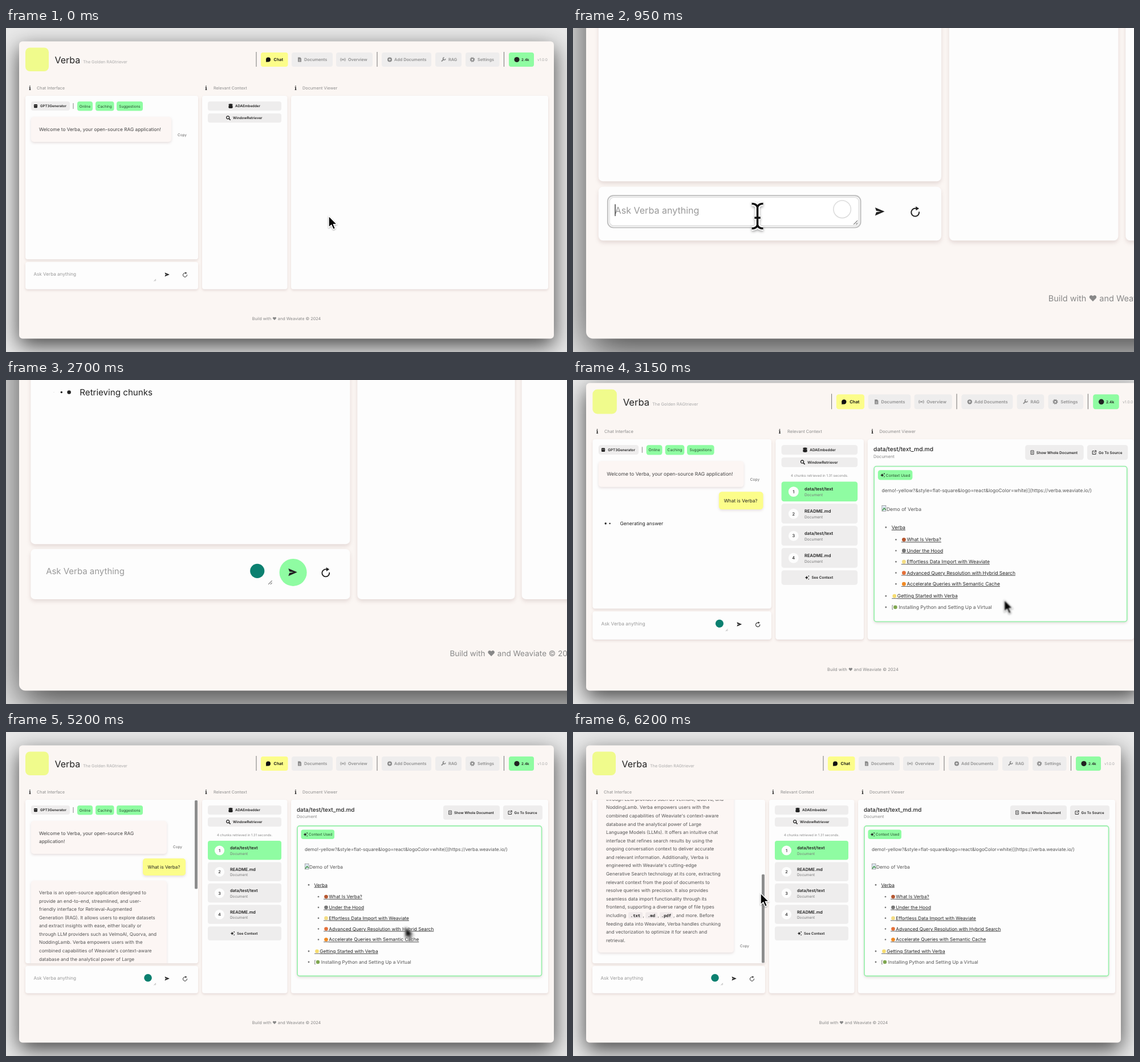
An HTML page that plays this animation: 984x569 px, repeating every 6250 ms.

```html
<!DOCTYPE html>
<html lang="en">
<head>
<meta charset="utf-8">
<style>
  html, body { margin: 0; width: 984px; height: 569px; overflow: hidden; background: #e8e8e8; }
  svg { display: block; font-family: Inter, "Open Sans", sans-serif; text-rendering: geometricPrecision; }
  .shadow { filter: drop-shadow(0 12px 18px rgba(0,0,0,.7)); }
  .soft { filter: drop-shadow(0 2px 2px rgba(110,70,70,.16)); }
  .mono { font-family: "Noto Sans Mono", monospace; }
  .serif { font-family: "Noto Serif", serif; }
</style>
</head>
<body>
<svg width="984" height="569" viewBox="0 0 984 569">
  <clipPath id="chatClip"><rect x="34" y="119" width="303" height="287" rx="4"/></clipPath>
  <g id="camera">
    <rect class="shadow" x="23" y="23.5" width="938" height="522" rx="6" fill="#fbf6f3"/>
    <g id="page"><g id="fixed"></g><g id="live"></g></g>
    <g id="pointer"></g>
  </g>
</svg>
<script>
const LOOP = 6250, GREEN = '#8ffca2', YELLOW = '#fcfd8a', GREY = '#eeeded', DARK = '#222', TEAL = '#0b8070';
const $ = id => document.getElementById(id);
const BOLD = 'font-weight="600"', MID = 'text-anchor="middle"', UNDER = 'text-decoration="underline"';

// x, vertical centre, size
const text = (x, y, size, str, fill = DARK, extra = '') =>
  `<text x="${x}" y="${y + size * .36}" font-size="${size}" fill="${fill}" ${extra}>${str}</text>`;
const box = (x1, y1, x2, y2, fill, r = 4, extra = '') =>
  `<rect x="${x1}" y="${y1}" width="${x2 - x1}" height="${y2 - y1}" rx="${r}" fill="${fill}" ${extra}/>`;
const disc = (x, y, r, fill, extra = '') => `<circle cx="${x}" cy="${y}" r="${r}" fill="${fill}" ${extra}/>`;
const stroke = (d, color, w = 1, extra = '') =>
  `<path d="${d}" fill="none" stroke="${color}" stroke-width="${w}" ${extra}/>`;
const at = (x, y, str) => `<g transform="translate(${x} ${y})">${str}</g>`;

const icon = {
  chat: c => disc(0, 0, 4, c) + `<path d="M-4 4.2L-3.6 0L0 3.8Z" fill="${c}"/>`,
  file: c => `<path d="M-3 -4H1L3 -2V4H-3Z" fill="${c}"/>` + stroke('M-1.5 0H1.5M-1.5 2H1.5', GREY, .7),
  waves: c => disc(0, 0, 1.2, c) + stroke('M-2 -2Q-3.4 0 -2 2M2 -2Q3.4 0 2 2M-3.4 -3Q-5.6 0 -3.4 3M3.4 -3Q5.6 0 3.4 3', c, .8),
  plus: c => disc(0, 0, 4, c) + stroke('M-2 0H2M0 -2V2', GREY, 1),
  wrench: c => stroke('M-3.2 3.2L1.2 -1.2', c, 1.8) + stroke('M1.6 -3.8A2.2 2.2 0 1 0 3.8 -1.6', c, 1.4),
  gear: c => disc(0, 0, 2.4, 'none', `stroke="${c}" stroke-width="1.8"`) +
    disc(0, 0, 3.8, 'none', `stroke="${c}" stroke-width="1.2" stroke-dasharray="1.6 1.38"`),
  bot: c => box(-3, -3, 3, 3.2, c, 1.2) + disc(-1.2, -.4, .6, '#fff') + disc(1.2, -.4, .6, '#fff'),
  data: c => [-2.6, 0, 2.6].map(y => `<ellipse cy="${y}" rx="3.6" ry="1.5" fill="${c}"/>`).join('') + box(-3.6, 1, 3.6, 2.4, c, 0),
  lens: c => disc(-.8, -.8, 2.5, 'none', `stroke="${c}" stroke-width="1.3"`) + stroke('M1 1L3.6 3.6', c, 1.5),
  star: c => `<path d="M-.8 -3Q-.3 -.5 2.2 0Q-.3 .5 -.8 3Q-1.3 .5 -3.8 0Q-1.3 -.5 -.8 -3Z" fill="${c}"/>` +
    disc(2.6, -2.6, .9, c) + disc(2.6, 2.6, .8, c),
  page: c => stroke('M-2.4 -3.2H2.4V3.2H-2.4ZM-1 -1H1M-1 1H1', c, .8),
  open: c => stroke('M0 -2.5H-3V3H2.6V0M-.6 .6L3.2 -3.2M.8 -3.2H3.2V-.8', c, .9),
  send: c => `<path d="M-4 -3.6L4.4 0L-4 3.6L-3 .6L1 0L-3 -.6Z" fill="${c}"/>`,
  reload: c => stroke('M3.4 -.4A3.5 3.5 0 1 1 1 -3.2', c, 1) + `<path d="M.4 -5.2L3.4 -3.3L.6 -1.5Z" fill="${c}"/>`,
};
const put = (name, x, y, c = DARK) => at(x, y, icon[name](c));

function drawFixed() {
  const nav = [['Chat', 'chat', 447, 494.5, 460, 469.5], ['Documents', 'file', 501, 573, 515, 523],
    ['Overview', 'waves', 579, 643, 591, 600], ['Add Documents', 'plus', 659, 746, 673, 681],
    ['RAG', 'wrench', 753, 799, 767, 776], ['Settings', 'gear', 806, 865.5, 818, 827]];
  const heads = [['Chat Interface', 42, 54], ['Relevant Context', 351, 364], ['Document Viewer', 508, 520]];
  return box(34, 34.5, 75, 76, '#f0fb8c', 8) +
    text(85.5, 56, 16, 'Verba') + text(135, 59.5, 7.2, 'The Golden RAGtriever', '#aaa') +
    stroke('M439 42V68M651 42V68M873.5 42V68', '#777', 1) +
    nav.map(([label, ic, x1, x2, ix, tx], i) => box(x1, 43, x2, 68, i ? GREY : YELLOW) +
      put(ic, ix, 55.5, i ? '#8a8a8a' : '#111') + text(tx, 55.5, 7.3, label, i ? '#8f8f8f' : '#111', BOLD)).join('') +
    box(882, 43, 926, 68, GREEN) + disc(896, 55.5, 4.6, DARK) + text(904, 55.5, 6.3, '2.4k', DARK, BOLD) +
    text(932, 55.5, 6.5, 'v1.0.0', '#aaa') +
    heads.map(([label, ix, x]) => text(ix, 105.5, 10, 'i', '#222', MID + ' class="serif" font-weight="800"') +
      text(x, 105.8, 7.3, label, '#8c8c8c')).join('');
}

const answer = `Verba is an open-source application designed to
provide an end-to-end, streamlined, and user-
friendly interface for Retrieval-Augmented
Generation (RAG). It allows users to explore datasets
and extract insights with ease, either locally or
through LLM providers such as VelmoAI, Quorva, and
NoddingLamb. Verba empowers users with the
combined capabilities of Weaviate's context-aware
database and the analytical power of Large
Language Models (LLMs). It offers an intuitive chat
interface that refines search results by using the
ongoing conversation context to deliver accurate
and relevant information. Additionally, Verba is
engineered with Weaviate's cutting-edge
Generative Search technology at its core, extracting
relevant context from the pool of documents to
resolve queries with precision. It also provides
seamless data import functionality through its
frontend, supporting a diverse range of file types
including .txt, .md, .pdf, and more. Before
feeding data into Weaviate, Verba handles chunking
and vectorization to optimize it for search and
retrieval.`;
const question = 'What is Verba?';
const SENT = 2350, CHUNKS = 3000, DOC = 3150, REPLY = 3950;

const clamp = u => Math.min(1, Math.max(0, u));
const ease = u => (u = clamp(u), u * u * (3 - 2 * u));
const mix = (a, b, u) => a + (b - a) * u;

// Critically damped spring
const spring = ms => { const u = Math.max(0, ms) / 100; return 1 - (1 + u) * Math.exp(-u); };
const zoomAt = t => 1 + .985 * (spring(t - 40) - spring(t - 2636));
const scrollAt = t => 237 * ease((t - 5600) / 520);

function fileLine(y) {
  const pill = (x1, x2, s) => box(x1, y - 5.5, x2, y + 5.5, '#f0eaea', 2) +
    text((x1 + x2) / 2, y, 7.2, s, DARK, MID + ' class="mono" font-weight="700"');
  return text(58, y, 8.2, 'including', '#555') + pill(97, 122, '.txt') + text(122.5, y, 8.2, ',', '#555') +
    pill(127, 148, '.md') + text(148.5, y, 8.2, ',', '#555') + pill(152, 175, '.pdf') +
    text(176, y, 8.2, ', and more. Before', '#555');
}

function drawChat(t) {
  const shown = answer.slice(0, Math.ceil(answer.length * clamp((t - REPLY) / 900)));
  const lines = shown ? shown.split('\n') : [];
  const narrow = lines.length > 8, dy = narrow ? 14 : 0, dx = narrow ? -8 : 0;
  const bubble = (y1, y2) => box(44, y1, 290 + dx, y2, '#fcf6f4', 5, 'class="soft"');
  const scroll = scrollAt(t);
  let s = box(44, 129, 112, 145, GREY) + put('bot', 52, 137) + text(60, 137, 6.1, 'GPT3Generator', DARK, BOLD) +
    stroke('M118 132V142', '#777', .9);
  for (const [x1, x2, label] of [[125, 152, 'Online'], [157, 189.5, 'Caching'], [194, 240, 'Suggestions']])
    s += box(x1, 129, x2, 145.5, GREEN) + text((x1 + x2) / 2, 137.2, 6.4, label, '#244a2b', MID);
  s += bubble(156, 200 + dy) + text(301 + dx, 187.3 + dy, 6.4, 'Copy', '#666');
  s += narrow
    ? text(58, 178, 8.3, 'Welcome to Verba, your open-source RAG', '#444') + text(58, 192.3, 8.3, 'application!', '#444')
    : text(58, 178, 8.3, 'Welcome to Verba, your open-source RAG application!', '#444');
  if (t >= SENT)
    s += box(248 + dx, 208 + dy, 323 + dx, 238 + dy, YELLOW, 5, 'class="soft"') + text(256.5 + dx, 223 + dy, 8, question);
  if (t >= SENT && !lines.length) {
    for (let i = 0; i < 3; i++) {
      const a = (210 + (t - 2700) * .4304 - i * 120) * Math.PI / 180;
      s += disc(56 + i * 7.2, 262, .95 * (1 + Math.cos(a)), DARK);
    }
    s += text(80.5, 262, 8.2, t < CHUNKS ? 'Retrieving chunks' : 'Generating answer');
  }
  const bottom = 289 + dy + 14.6 * (lines.length - 1);
  if (lines.length) {
    s += bubble(247 + dy, bottom);
    s += lines.map((line, i) => {
      const y = 268 + dy + 14.58 * i;
      return i == 19 && line.endsWith('Before') ? fileLine(y) : text(58, y, 8.2, line, '#555');
    }).join('');
    s += text(301 + dx, bottom - 12, 6.4, 'Copy', '#666');
  }
  let bar = '';
  if (narrow) {
    const full = Math.max(288, bottom + 19 - 119), thumb = 284 * 287 / full, y = 120 + scroll * 130 / 237;
    bar = box(331, y, 336, y + thumb, '#8d8d8d', 1.5);
  }
  return `<g clip-path="url(#chatClip)">${at(0, -scroll, s)}${bar}</g>`;
}

function drawInput(t) {
  const focus = t >= 380 && t < SENT;
  const typed = t < SENT ? question.slice(0, Math.max(0, Math.floor((t - 1150) / 40))) : '';
  const hint = t >= 1350 && t < SENT;
  let s = '';
  if (focus) s += box(42.1, 418.9, 265.7, 447.2, '#fff', 5, 'stroke="#c2c2c2" stroke-width="1.1"') +
    box(43.7, 420.5, 264.1, 445.6, 'none', 3.5, 'stroke="#d6d6d6" stroke-width=".6"');
  s += typed
    ? text(48.7, 431.9, 8.05, typed + '<tspan dx="-.8" font-weight="300">|</tspan>')
    : text(48.5, 432, 8.1, 'Ask Verba anything', '#999') + (focus ? stroke('M48.7 426.5V437', '#111', .6) : '');
  s += stroke('M259.5 444.5L263 441M261.5 444.5L263 443', '#777', .6);
  if (t >= SENT) s += disc(249, 431.8, 6.8, TEAL);
  else if (typed) s += disc(251.2, 431.7, 2.3, TEAL);
  else if (focus) s += disc(249.4, 431, 7.7, '#fff', 'stroke="#dcdcdc" stroke-width=".8"');
  if (t > 2180 && t < 2760) s += disc(283, 433.2, 13, GREEN);
  s += put('send', 282.5, 433) + put('reload', 314, 433.6);
  if (hint) {
    const bold = typed.slice(0, 13), rest = 'What is Verba'.slice(bold.length);
    s += box(33.6, 463, 337, 488.7, '#ededed') +
      text(186.2, 475.9, 7, `<tspan ${BOLD}>${bold}</tspan>${rest} ?`, DARK, MID);
  }
  return s;
}

function drawContext(t) {
  let s = '';
  for (const [y, ic, ix, tx, label] of [[137, 'data', 394, 402, 'ADAEmbedder'], [158, 'lens', 390, 398, 'WindowRetriever']])
    s += box(354, y - 8, 483, y + 8.3, GREY) + put(ic, ix, y) + text(tx, y, 6.2, label, DARK, BOLD);
  if (t < CHUNKS) return s;
  s += text(418.5, 181, 5.9, '4 chunks retrieved in 1.31 seconds.', '#888', MID);
  for (let i = 0; i < 4; i++) {
    const y = 191 + i * 37.5;
    s += box(354, y, 483, y + 33.5, i ? GREY : GREEN) + disc(374.5, y + 17, 8.6, '#fdfdfd') +
      text(374.5, y + 17, 7.3, i + 1, DARK, MID + ' font-weight="500"') +
      text(393, y + 12.6, 7.4, i % 2 ? 'README.md' : 'data/test/text', DARK, BOLD) +
      text(393, y + 22.4, 6.4, 'Document', '#777');
  }
  return s + box(354, 341.5, 483, 366, GREY) + put('star', 397.5, 353.8) + text(405, 353.8, 6.2, 'See Context', DARK, BOLD);
}

function drawDoc() {
  const links = [['What Is Verba?', '#b5562f'], ['Under the Hood', '#777'], ['Effortless Data Import with Weaviate', '#f3dc83'],
    ['Advanced Query Resolution with Hybrid Search', '#e4703a'], ['Accelerate Queries with Semantic Cache', '#f08a24']];
  const link = (x, y, label, color) => disc(x + 4.5, y, 3.3, color) + stroke(`M${x} ${y + 4.2}h9.5`, DARK, .7) +
    text(x + 9.3, y, 8.2, label, DARK, UNDER);
  let s = text(510, 136, 9.9, 'data/test/text_md.md', DARK, 'font-weight="500"') + text(510, 148.6, 7.3, 'Document', '#888') +
    box(767, 129, 866, 154, GREY) + put('page', 779, 141.5) + text(786, 141.5, 6.2, 'Show Whole Document', DARK, BOLD) +
    box(872, 129, 941, 154, GREY) + put('open', 884, 141.5) + text(891.5, 141.5, 6.2, 'Go To Source', DARK, BOLD) +
    box(511, 165, 939.5, 428.5, '#fdfdfd', 4, `class="soft" stroke="#9cf0ae" stroke-width="1.8"`) +
    box(517.5, 171.5, 576, 188, GREEN) + put('star', 525.5, 180) + text(531, 180, 6.4, 'Context Used', '#244a2b') +
    text(524, 206, 8.2, 'demo!-yellow?&amp;style=flat-square&amp;logo=react&amp;logoColor=white)](https://verba.weaviate.io/)', '#555') +
    box(524.3, 231.5, 531, 241, '#dfe9f5', 0, 'stroke="#888" stroke-width=".7"') + stroke('M525 240L528 236L531 239', '#4c9b51', 1.6) +
    text(532, 237.3, 8.3, 'Demo of Verba', '#555') + text(540.5, 268.5, 8.4, 'Verba', DARK, UNDER);
  for (const y of [268.5, 385, 404]) s += disc(531, y, 1.4, '#777');
  links.forEach(([label, color], i) => {
    const y = 289.3 + i * 18.8;
    s += disc(548, y, 1.3, '#777') + link(557, y, label, color);
  });
  return s + link(541, 385, 'Getting Started with Verba', '#f6dc70') +
    text(540.5, 404, 8.2, '[', '#555') + disc(547, 404, 3.2, '#7fa650') +
    text(552.7, 404, 8.2, 'Installing Python and Setting Up a Virtual', '#555');
}

function drawLive(t) {
  const hint = t >= 1350 && t < SENT;
  const panels = `<g class="soft">${[[34, 119, 337, 406.3], [34, 411, 337, 458.7], [344, 119, 493.5, 458.7], [500, 119, 951, 458.7]]
    .map(p => box(...p, '#fdfdfd')).join('')}</g>`;
  return at(0, hint ? -.9 : 0, panels + drawChat(t) + drawInput(t) + drawContext(t) + (t >= DOC ? drawDoc() : '')) +
    text(492, hint ? 534.7 : 510, 7.3, 'Build with ♥ and Weaviate © 2024', '#888', MID);
}

// start, end, from, to
const moves = [[40, 400, [566, 330], [174.5, 437]], [2000, 2230, [174.5, 437], [281, 431]],
  [2700, 3350, [560, 420], [781, 383]], [5080, 5530, [781, 383], [329, 153]], [5600, 6120, [329, 153], [329, 283]]];
function pointerAt(t) {
  const [a, b, from, to] = moves.findLast(m => t >= m[0]) || moves[0];
  const u = ease((t - a) / (b - a));
  return [mix(from[0], to[0], u), mix(from[1], to[1], u)];
}

function drawPointer(t) {
  if (t > 2620 && t < 2800) return '';
  const [x, y] = pointerAt(t), [px, py] = pointerAt(t - 16);
  const blur = Math.min(2.2, Math.hypot(x - px, y - py) / 6);
  const beam = t > 330 && t < 2060;
  const d = beam ? 'M-5 -11Q-1 -11 0 -8Q1 -11 5 -11M0 -8V8M-5 11Q-1 11 0 8Q1 11 5 11M-2.6 1.5H2.6'
    : 'M0 0V20.4L4.7 16L8 23.6L11.6 22L8.4 14.7H14.6Z';
  const size = beam ? mix(.82, 1, ease((t - 430) / 250)) : 1;
  const shape = beam ? stroke(d, '#fff', 4) + stroke(d, '#111', 1.8)
    : `<path d="${d}" fill="#050505" stroke="#fff" stroke-width="1.5" stroke-linejoin="round"/>`;
  const soft = blur > .3 ? `blur(${blur}px) ` : '';
  return `<g transform="translate(${x} ${y}) scale(${size})"><g style="filter:${soft}drop-shadow(0 1px 1px rgba(0,0,0,.35))">${shape}</g></g>`;
}

function frame() {
  const t = performance.now() % LOOP, zoom = zoomAt(t);
  const speed = Math.abs(zoom - zoomAt(t - 10)) * 100;
  $('camera').setAttribute('transform', `translate(23 545.5) scale(${zoom}) translate(-23 -545.5)`);
  $('page').style.filter = speed > 1 ? `blur(${speed * .12}px)` : '';
  $('live').innerHTML = drawLive(t);
  $('pointer').innerHTML = drawPointer(t);
  requestAnimationFrame(frame);
}
$('fixed').innerHTML = drawFixed();
frame();
</script>
</body>
</html>
```
